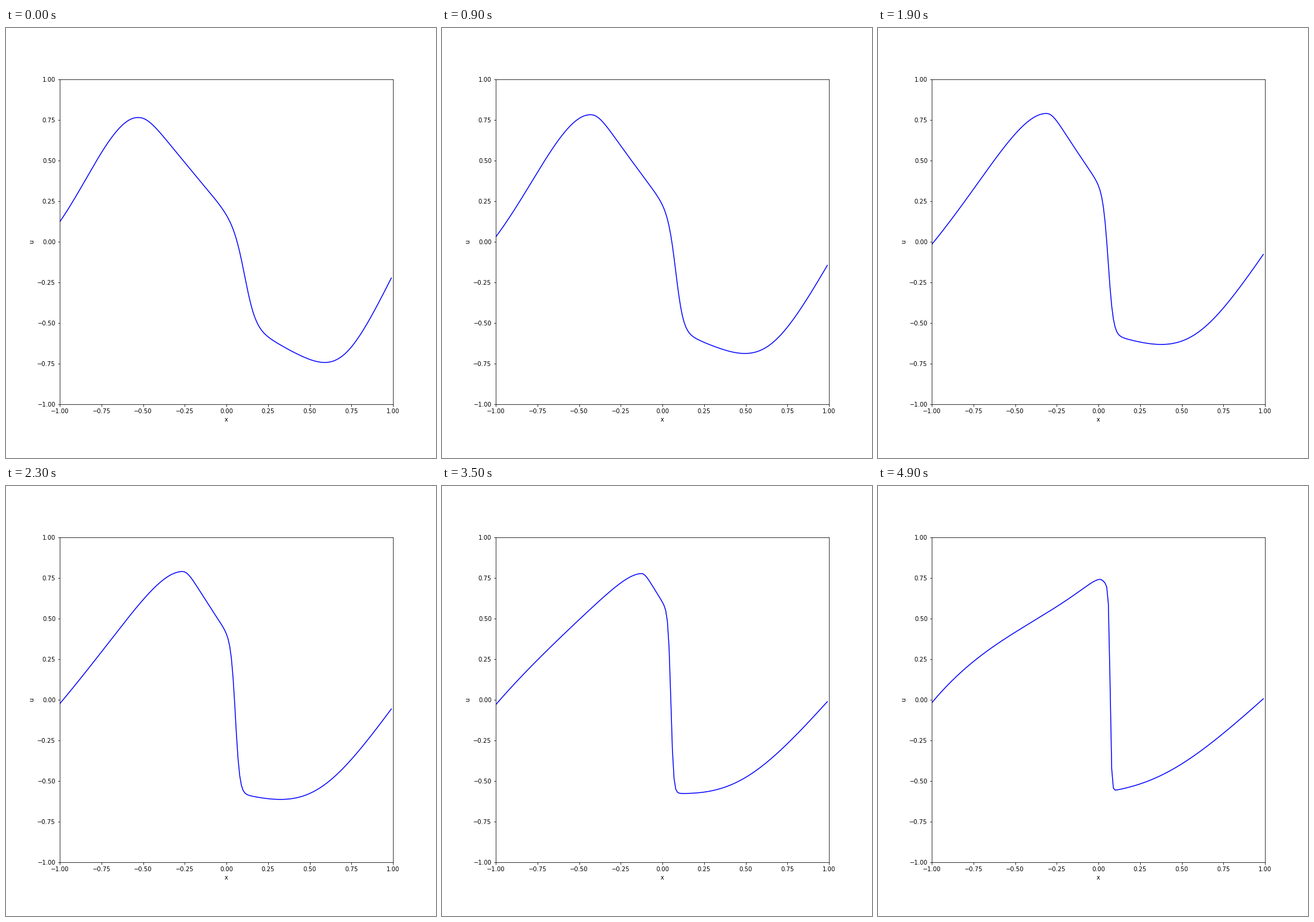
A matplotlib script that plays this animation: 720 px wide and 720 px high, repeating every 5000 ms.

```python
import numpy as np
import matplotlib.pyplot as plt
from matplotlib.animation import FuncAnimation

FRAMES, INTERVAL = 50, 100
X = -1 + 0.01 * np.arange(200)


def softplus(z):
    return np.logaddexp(0, z)


def sigmoid(z):
    return 0.5 + 0.5 * np.tanh(z / 2)


def ramp(q, t):
    """Rise from 0 to 1 that levels off ever more abruptly at the crest."""
    power = 3.7 / (1 - 0.87 * t)
    bend = 1.1 * t**2 - 0.35
    return (power * q - q**power) / (power - 1) + bend * q * (1 - q) * (0.8 - q)


def fall(d, t):
    """Drop at distance d behind the crest: a rounded slope and a small step."""
    radius = 0.03 + 0.09 * (1 - t)**1.5
    steepness = 1.2 + 0.9 * t - 0.5 * t**2
    step = 0.09 * (1 - t**2)
    return (steepness * (np.hypot(d, radius) - radius)
            + step * d**2 / (d**2 + (1.6 * radius)**2))


def left_branch(t):
    crest_x = -0.525 + t * (0.563 - 0.169 * (t - 0.58)**2)
    crest = 0.766 + 0.12 * t - 0.143 * t**2
    edge = -0.034 + 0.158 * (1 - t)**4.4 + 0.016 * t**4
    q = np.clip((X + 1) / (crest_x + 1), 0, 1)
    behind = np.maximum(X - crest_x, 0)
    return edge + (crest - edge) * ramp(q, t) - fall(behind, t)


def right_branch(t):
    """Two straight slopes joined by a soft bend, pinned at the last sample."""
    end = 0.007 - 0.229 * (1 - t)**2.05
    slope_in = -0.6 * (1 - t)**1.15
    slope_out = 2.1 - 1.65 * t + 0.5 * t**2
    bend_x, width = 0.69 - 0.33 * t, 0.08 + 0.11 * t
    bend = softplus((X - bend_x) / width)
    return (end + slope_in * (X - X[-1])
            + (slope_out - slope_in) * width * (bend - bend[-1]))


def wave(n):
    t = n / (FRAMES - 1)
    front_x = 0.0505 + 0.156 * (t - 0.64)**2
    front_width = 0.033 * np.exp(-2 * t)
    mix = sigmoid((X - front_x) / front_width)
    return (1 - mix) * left_branch(t) + mix * right_branch(t)


fig, ax = plt.subplots(figsize=(10, 10), dpi=72)
fig.subplots_adjust(left=0.125, right=0.9, bottom=0.125, top=0.88)
ax.set(xlim=(-1, 1), ylim=(-1, 1), xlabel="x", ylabel="u")
line, = ax.plot(X, wave(0), color="blue", linewidth=1.5)


def update(n):
    line.set_ydata(wave(n))
    return line,


anim = FuncAnimation(fig, update, frames=FRAMES, interval=INTERVAL,
                     repeat=True, repeat_delay=0)
plt.show()
```
